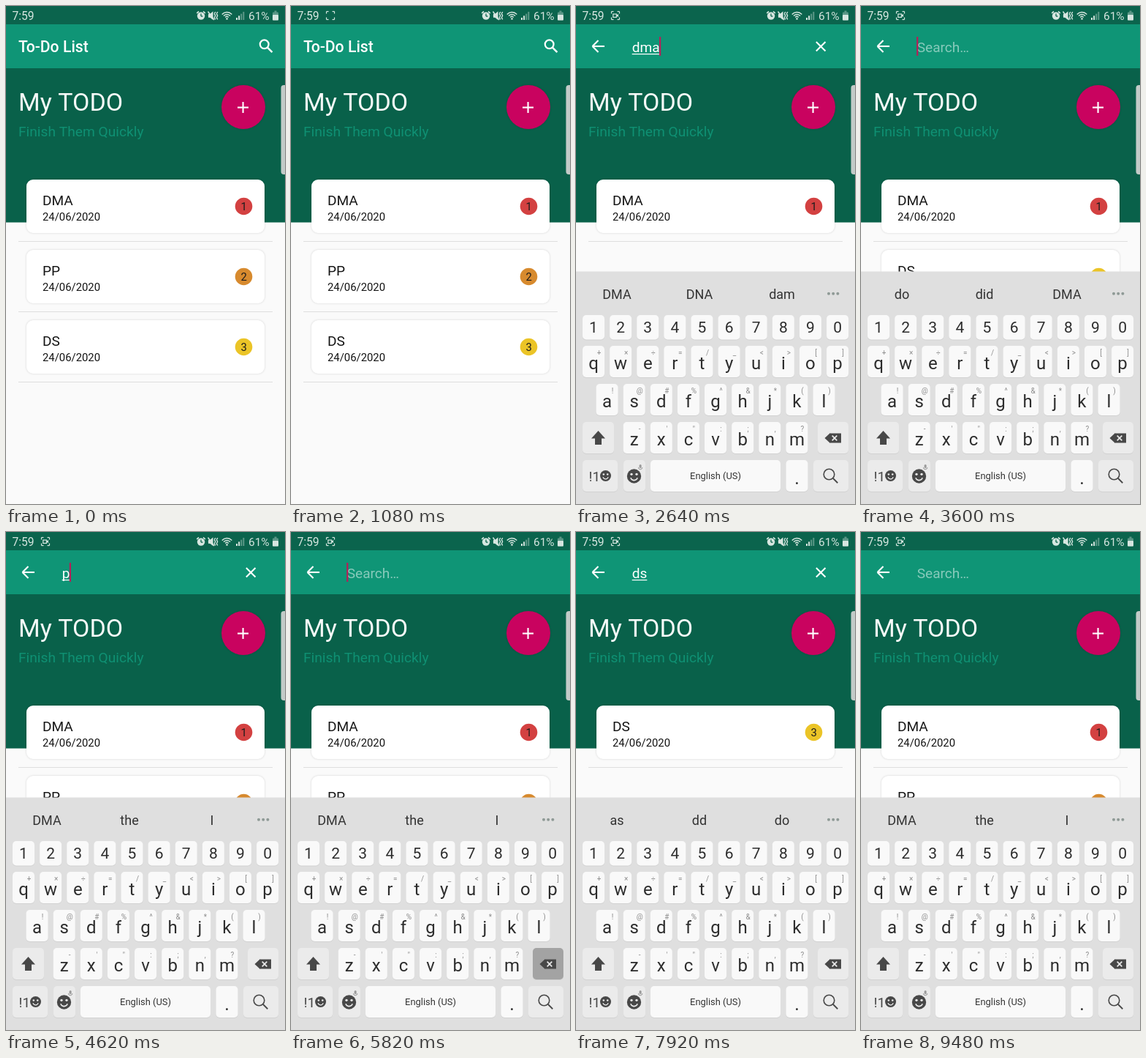
Write an HTML page with a canvas that moves like this. It is 382 px wide and 680 px high and loops after 9960 ms.

```html
<!DOCTYPE html>
<html lang="en">
<head>
<meta charset="utf-8">
<title>To-Do List</title>
<style>
html, body { margin: 0; width: 100%; height: 100%; overflow: hidden; background: #fafafa; }
canvas { display: block; }
</style>
</head>
<body>
<canvas id="stage" width="382" height="680"></canvas>
<script>
const ctx = document.getElementById('stage').getContext('2d');
const LOOP = 9960, STEP = 60;
const OPEN_AT = 1120, RESPONSE = 150, PITCH = 37.12;
const WHITE = '#ffffff', INK = '#484848', LETTER = '#2d2d2d', SPECIAL = '#ebebeb';

const tasks = [
  { name: 'DMA', color: '#d34141' },
  { name: 'PP', color: '#d78a2e' },
  { name: 'DS', color: '#ebc427' }
];

const suggestions = {
  '': 'DMA the I', d: 'do did DMA', dm: 'DMA dm am', dma: 'DMA DNA dam',
  p: 'p PP please', ds: 'as dd do'
};

// Each burst types its keys at an even pace; '<' is backspace.
const bursts = [
  { at: 2100, keys: 'dma', gap: 180 },
  { at: 3300, keys: '<<<', gap: 120 },
  { at: 4535, keys: 'p', gap: 0 },
  { at: 5400, keys: '<<', gap: 400 },
  { at: 6120, keys: 'ds', gap: 300 },
  { at: 8780, keys: '<<', gap: 160 }
];
const strokes = bursts.flatMap(b => [...b.keys].map((key, i) => ({ key, at: b.at + i * b.gap })));

function typed(t) {
  const done = strokes.filter(s => s.at <= t);
  return {
    value: done.reduce((s, { key }) => key === '<' ? s.slice(0, -1) : s + key, ''),
    at: done.length ? done[done.length - 1].at : OPEN_AT
  };
}

function rect(x, y, w, h, r, color) {
  ctx.fillStyle = color;
  ctx.beginPath();
  ctx.roundRect(x, y, w, h, r);
  ctx.fill();
}

function disc(x, y, r, color) {
  ctx.fillStyle = color;
  ctx.beginPath();
  ctx.arc(x, y, r, 0, Math.PI * 2);
  ctx.fill();
}

function arc(x, y, r, color, width, from = 0, to = Math.PI * 2) {
  ctx.strokeStyle = color;
  ctx.lineWidth = width;
  ctx.beginPath();
  ctx.arc(x, y, r, from, to);
  ctx.stroke();
}

function line(color, width, x1, y1, x2, y2) {
  ctx.strokeStyle = color;
  ctx.lineWidth = width;
  ctx.beginPath();
  ctx.moveTo(x1, y1);
  ctx.lineTo(x2, y2);
  ctx.stroke();
}

function cross(x, y, r, color, width) {
  line(color, width, x - r, y - r, x + r, y + r);
  line(color, width, x - r, y + r, x + r, y - r);
}

// Isosceles triangle with its tip at (x, y); angle 0 points left.
function triangle(x, y, length, half, angle, color) {
  ctx.save();
  ctx.translate(x, y);
  ctx.rotate(angle);
  ctx.fillStyle = color;
  ctx.beginPath();
  ctx.moveTo(0, 0);
  ctx.lineTo(length, -half);
  ctx.lineTo(length, half);
  ctx.fill();
  ctx.restore();
}

function magnifier(x, y, r, color, width, handle) {
  const d = r * 0.72;
  arc(x, y, r, color, width);
  line(color, width * 1.15, x + d, y + d, x + d + handle, y + d + handle);
}

function text(s, x, y, size, color, align = 'left', weight = 400) {
  ctx.font = `${weight} ${size}px Roboto, sans-serif`;
  ctx.fillStyle = color;
  ctx.textAlign = align;
  ctx.fillText(s, x, y);
}

function withShadow(paint) {
  ctx.save();
  ctx.shadowColor = 'rgba(0,0,0,.16)';
  ctx.shadowBlur = 3;
  paint();
  ctx.restore();
}

function drawRecorder(t, color) {
  const x = 54, y = 13;
  ctx.save();
  ctx.globalAlpha = Math.min(1, t / 420);
  for (const sx of [-1, 1]) {
    for (const sy of [-1, 1]) {
      const cx = x + sx * 5.5, cy = y + sy * 5.5;
      line(color, 1.2, cx, cy, cx - sx * 3, cy);
      line(color, 1.2, cx, cy, cx, cy - sy * 3);
    }
  }
  if (t >= 1500) {
    ctx.strokeRect(x - 3.2, y - 2, 4.6, 4.4);
    triangle(x + 1, y, 3, 2.3, 0, color);
  }
  ctx.restore();
}

function drawStatus(t) {
  const bar = '#0b644d', c = '#d7e6e0', dim = 'rgba(215,230,224,.4)';
  rect(0, 0, 382, 25, 0, bar);
  text('7:59', 8.5, 19, 15.6, c);
  if (t) drawRecorder(t, c);

  disc(267, 13.5, 5.2, c);
  line(bar, 1.3, 267, 10.5, 267, 14);
  line(bar, 1.3, 267, 14, 269.5, 14);
  for (const s of [-1, 1]) line(c, 1.7, 267 + s * 5.8, 9.8, 267 + s * 3, 7.3);

  rect(277, 10.8, 3, 5, 0, c);
  triangle(276.5, 13.3, 7, 6, 0, c);
  line(c, 1.5, 276.5, 7.5, 285, 19);
  for (const x of [286, 289]) {
    for (let i = 0; i < 4; i++) {
      const s = i % 2 ? 0.8 : -0.8;
      line(c, 1.4, x - s, 8 + i * 2.6, x + s, 10.6 + i * 2.6);
    }
  }

  for (let i = 0; i < 3; i++) arc(302.5, 17.5, 3 + i * 3, c, 1.5, -Math.PI * 0.77, -Math.PI * 0.23);
  disc(302.5, 17.5, 1.3, c);
  for (let i = 0; i < 4; i++) {
    const h = 3 + i * 2.7;
    rect(315 + i * 3.1, 19 - h, 2, h, 0, i < 2 ? c : dim);
  }

  text('61%', 332, 19, 15.4, c);
  rect(367.5, 6.5, 3, 2, 0, dim);
  rect(365, 8.5, 8, 11, 1, dim);
  rect(365, 12, 8, 7.5, 1, c);
}

function drawToolbar(t, value, caret) {
  rect(0, 25, 382, 60, 0, '#0f9576');
  if (t < OPEN_AT) {
    text('To-Do List', 17, 63.3, 21.2, WHITE, 'left', 500);
    magnifier(353.7, 52.3, 5.9, WHITE, 2.2, 6.5);
    return;
  }
  line(WHITE, 2.1, 39, 55, 23, 55);
  for (const s of [-1, 1]) line(WHITE, 2.1, 22.5, 55, 30.5, 55 + s * 8);

  let x = 76.7;
  if (value) {
    text(value, x, 62.5, 19.1, WHITE);
    const w = ctx.measureText(value).width;
    rect(x, 65, w, 1.2, 0, WHITE);
    x += w;
    cross(335.2, 55.2, 6.3, WHITE, 2.1);
  } else {
    text('Search…', x, 62.5, 19.1, 'rgba(255,255,255,.5)');
  }
  if (caret) rect(x - 0.6, 42, 2.2, 26, 0, '#b51f58');
}

function drawHeader() {
  rect(0, 85, 382, 210.5, 0, '#09614a');
  text('My TODO', 17, 143, 34, '#f6faf8');
  text('Finish Them Quickly', 17, 178, 19.2, '#0f9073');
  withShadow(() => disc(325, 138, 30, '#c9035f'));
  rect(317, 137.5, 15, 2.1, 0, WHITE);
  rect(323.5, 131, 2.1, 15, 0, WHITE);
}

function drawTasks(query) {
  const shown = tasks.filter(k => k.name.toLowerCase().includes(query));
  shown.forEach((task, i) => {
    const y = 237 + i * 96;
    withShadow(() => rect(28, y, 326, 73, 9, WHITE));
    text(task.name, 50, y + 34.5, 19.1, '#151515');
    text('24/06/2020', 50, y + 55.7, 14.86, '#151515');
    disc(325.5, y + 36.5, 11.8, task.color);
    text(tasks.indexOf(task) + 1, 325.7, y + 42, 14.86, '#1c1c1c', 'center');
    rect(17, y + 84, 348, 1.1, 0, '#dedede');
  });
}

function key(x, y, w, h, color = '#f9f9f9') {
  rect(x, y + 1, w, h, 5, '#d2d2d2');
  rect(x, y, w, h, 5, color);
}

function letterRow(letters, hints, row, down) {
  const y = 464 + row * 52;
  [...letters].forEach((ch, i) => {
    const cx = 24 + (i + row / 2) * PITCH;
    key(cx - 15, y, 30, 43, down === ch ? '#a3a3a3' : undefined);
    text(ch, cx, y + 32, 24, LETTER, 'center');
    text(hints[i], cx + 7.5, y + 13, 10, '#8d8d8d', 'center');
  });
}

function smiley(x, y, r) {
  disc(x, y, r, INK);
  for (const s of [-1, 1]) disc(x + s * r * 0.36, y - r * 0.28, r * 0.17, SPECIAL);
  arc(x, y + r * 0.08, r * 0.5, SPECIAL, r * 0.17, 0.3, Math.PI - 0.3);
}

function drawKeyboard(words, down) {
  rect(0, 362.5, 382, 360, 0, '#dfdfdf');
  words.forEach((w, i) => text(w, 56 + i * 113, 399.5, 18, '#333333', 'center'));
  for (let i = 0; i < 3; i++) disc(346 + i * 6.2, 392.7, 2, '#8f9a96');

  [...'1234567890'].forEach((ch, i) => {
    const cx = 24 + i * PITCH;
    key(cx - 15, 422, 30, 33.5);
    text(ch, cx, 446.3, 21, LETTER, 'center');
  });
  letterRow('qwertyuiop', '+×÷=/_<>[]', 0, down);
  letterRow('asdfghjkl', '!@#%^&*()', 1, down);
  // The last letter row is inset one and a half keys.
  ctx.save();
  ctx.translate(PITCH / 2, 0);
  letterRow('zxcvbnm', '-\'":;,?', 2, down);
  ctx.restore();

  key(9, 568, 43, 43, SPECIAL);
  triangle(30.5, 580, 10.5, 9.5, Math.PI / 2, INK);
  rect(26, 590, 9, 9, 0, INK);

  key(331, 568, 42, 43, down === '<' ? '#a3a3a3' : SPECIAL);
  triangle(340.5, 590, 7, 6.5, 0, INK);
  rect(347, 583.5, 16, 13, 0, INK);
  cross(354, 590, 3.3, SPECIAL, 1.7);

  key(9, 620, 48, 43, SPECIAL);
  text('!1', 17.5, 648.5, 19, INK);
  smiley(40.5, 641.5, 7.5);
  key(65, 620, 30, 43, SPECIAL);
  smiley(79.5, 642, 9.7);
  rect(86.6, 626, 3, 5, 1.5, '#9a9a9a');
  arc(88.1, 630, 2.7, '#9a9a9a', 1, 0, Math.PI);

  key(102, 620, 178, 43);
  text('English (US)', 191, 646, 12.9, '#333333', 'center');
  key(287.5, 620, 30, 43);
  text('.', 302.5, 652.5, 25, LETTER, 'center');
  key(325, 620, 48, 43, SPECIAL);
  magnifier(346.5, 639.5, 7.3, INK, 1.6, 6.5);
}

function draw(t) {
  const now = typed(t), query = typed(t - RESPONSE).value;
  const caret = (t - now.at) % 1000 < 500;
  const press = strokes.find(s => Math.abs(t - s.at - 10) < 50);

  rect(0, 0, 382, 680, 0, '#fafafa');
  drawHeader();
  drawTasks(query);
  drawToolbar(t, now.value, caret);
  drawStatus(t);
  rect(376.5, 108, 9, 122, 4, '#c3cbc8');

  const rise = Math.min(1, (t - 1320) / 200);
  if (rise > 0) {
    ctx.save();
    ctx.globalAlpha = Math.min(1, rise * 2);
    ctx.translate(0, 32 * (1 - rise) ** 2);
    drawKeyboard(suggestions[query].split(' '), press && press.key);
    ctx.restore();
  }
}

function frame(now) {
  const t = now % LOOP;
  draw(t - t % STEP);
  requestAnimationFrame(frame);
}

requestAnimationFrame(frame);
</script>
</body>
</html>
```
